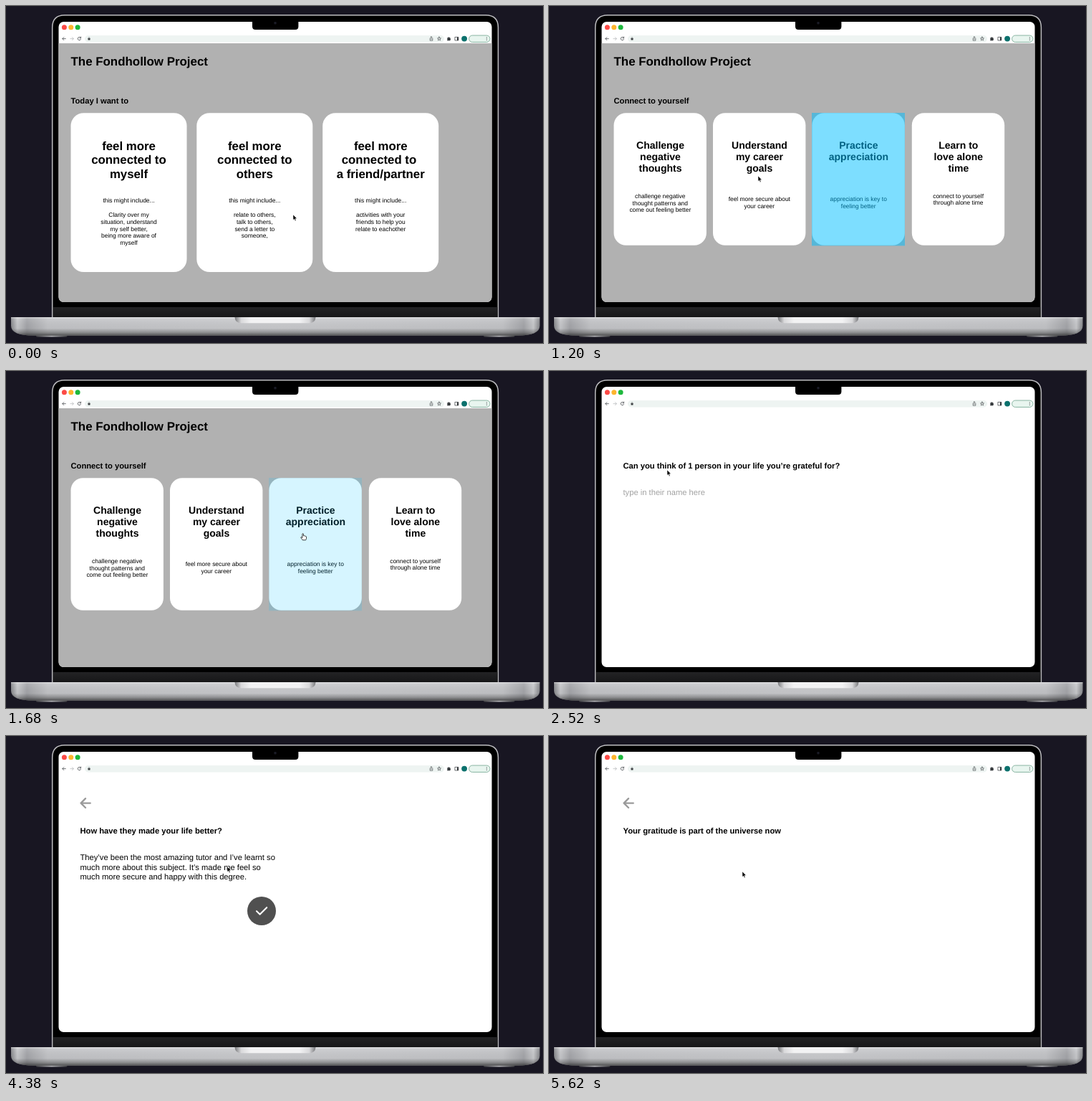
Recreate the animation shown at these times as an HTML page. Size 750 px wide and 470 px high, loop 5.7 s.

```html
<!DOCTYPE html>
<html lang="en">
<head>
<meta charset="utf-8">
<title>Connection prototype</title>
<style>
html, body { margin: 0; width: 100%; height: 100%; overflow: hidden; background: #181622; }
svg { display: block; width: 750px; height: 470px; }
text { font-family: "Liberation Sans", Arial, sans-serif; text-rendering: geometricPrecision; white-space: pre; }
.b { font-weight: bold; }
.m { text-anchor: middle; }
.line { fill: none; stroke-linecap: round; stroke-linejoin: round; }
</style>
</head>
<body>
<svg viewBox="0 0 750 470">
  <defs>
    <linearGradient id="metal">
      <stop offset="0" stop-color="#85868a"/><stop offset=".012" stop-color="#c9cacd"/>
      <stop offset=".03" stop-color="#a5a6aa"/><stop offset=".07" stop-color="#c4c5c8"/>
      <stop offset=".5" stop-color="#cacbce"/><stop offset=".93" stop-color="#c4c5c8"/>
      <stop offset=".97" stop-color="#a5a6aa"/><stop offset=".988" stop-color="#c9cacd"/>
      <stop offset="1" stop-color="#85868a"/>
    </linearGradient>
    <linearGradient id="shade" x2="0" y2="1">
      <stop offset="0" stop-color="#fff" stop-opacity=".45"/><stop offset=".1" stop-color="#fff" stop-opacity=".08"/>
      <stop offset=".6" stop-color="#000" stop-opacity=".04"/><stop offset=".82" stop-color="#000" stop-opacity=".28"/>
      <stop offset="1" stop-color="#000" stop-opacity=".6"/>
    </linearGradient>
    <linearGradient id="lip">
      <stop offset="0" stop-color="#77787b"/><stop offset=".08" stop-color="#d9d9db"/>
      <stop offset=".2" stop-color="#f2f2f3"/><stop offset=".8" stop-color="#f2f2f3"/>
      <stop offset=".92" stop-color="#d9d9db"/><stop offset="1" stop-color="#77787b"/>
    </linearGradient>
    <linearGradient id="hinge" x2="0" y2="1">
      <stop offset="0" stop-color="#232325"/><stop offset="1" stop-color="#161617"/>
    </linearGradient>
    <linearGradient id="foot">
      <stop offset="0" stop-color="#3c3c40"/><stop offset=".5" stop-color="#b4b4b8"/><stop offset="1" stop-color="#3c3c40"/>
    </linearGradient>
    <clipPath id="glass"><rect x="73.5" y="22" width="605" height="391" rx="7"/></clipPath>
  </defs>

  <rect width="750" height="470" fill="#181622"/>
  <path d="M64.7 436V30Q64.7 12.7 82 12.7H670Q687.4 12.7 687.4 30V436Z" fill="#000" stroke="#bcbcbf" stroke-width="1.5"/>
  <rect x="66" y="420" width="620.5" height="15" fill="url(#hinge)"/>

  <g clip-path="url(#glass)">
    <rect x="73" y="22" width="606" height="392" fill="#fff"/>
    <g id="pages"></g>
    <g id="chrome">
      <circle cx="81.4" cy="29.8" r="3.5" fill="#fc4b47"/>
      <circle cx="90.8" cy="29.8" r="3.5" fill="#fdb52e"/>
      <circle cx="100.1" cy="29.8" r="3.5" fill="#1db83c"/>
      <rect x="110" y="41" width="502" height="9.4" rx="4.7" fill="#eef4f2"/>
      <g class="line" stroke="#4b4f52" stroke-width=".8">
        <path d="M83.3 45.6H79M80.8 43.6L78.8 45.6L80.8 47.6"/>
        <path d="M89.9 45.6H94.2M92.4 43.6L94.4 45.6L92.4 47.6" stroke="#b9bcbe"/>
        <path d="M104.2 44.2A2.2 2.2 0 1 0 104.5 46.3M104.6 43V44.8H102.8"/>
        <path d="M592.2 45V48.2H595.8V45M594 46.6V42.8M592.9 43.8L594 42.7L595.1 43.8" stroke-width=".7"/>
        <path d="M605 43L605.7 44.8L607.5 44.9L606.1 46.1L606.6 47.9L605 46.9L603.4 47.9L603.9 46.1L602.5 44.9L604.3 44.8Z" stroke-width=".7"/>
        <rect x="627.3" y="43.4" width="4.4" height="4.6"/>
        <path d="M115.1 45.5V44.6A.9 .9 0 0 1 116.9 44.6V45.5" stroke-width=".6"/>
      </g>
      <rect x="114.5" y="45" width="3" height="2.6" rx=".4" fill="#3c4043"/>
      <path d="M616.2 44.2H617.6A.9 .9 0 0 1 619.4 44.2H620.5V45.4A.9 .9 0 0 1 620.5 47.1V48.2H616.2V46.8A.8 .8 0 0 0 616.2 45.4Z" fill="#35393c"/>
      <rect x="630" y="43.4" width="2" height="4.6" fill="#35393c"/>
      <circle cx="640.1" cy="45.6" r="3.9" fill="#0c716d"/>
      <rect x="646.6" y="41" width="29.4" height="9.4" rx="4.7" fill="#e8f5ef" stroke="#6da38c" stroke-width=".8"/>
      <g fill="#4b4f52"><circle cx="671.3" cy="43.9" r=".55"/><circle cx="671.3" cy="45.7" r=".55"/><circle cx="671.3" cy="47.5" r=".55"/></g>
    </g>
  </g>

  <path d="M344 20H408.4V28.5Q408.4 33 404 33H348.4Q344 33 344 28.5Z" fill="#000"/>
  <circle cx="376" cy="23.7" r="2" fill="#14151c"/><circle cx="376" cy="23.7" r=".8" fill="#25283a"/>

  <rect x="42" y="458" width="43.5" height="3.6" rx="1.6" fill="url(#foot)"/>
  <rect x="667" y="458" width="43.5" height="3.6" rx="1.6" fill="url(#foot)"/>
  <g id="base">
    <path d="M7 434H745.5V446Q745.5 459.5 714 459.8H39Q7 459.5 7 446Z" fill="url(#metal)"/>
    <path d="M7 434H745.5V446Q745.5 459.5 714 459.8H39Q7 459.5 7 446Z" fill="url(#shade)"/>
    <path d="M319.5 434H432.5Q432 442.3 423 442.3H329Q320 442.3 319.5 434Z" fill="url(#lip)"/>
  </g>

  <path id="arrow" d="M0 0V7.5L1.7 6L2.9 8.7L4.1 8.2L3 5.5L5.3 5.4Z" fill="#000" stroke="#fff" stroke-width=".5"/>
  <path id="hand" d="M-.7 .6Q0 -.5 .8 .6V3.2Q1.7 2.6 2.2 3.5Q3.1 3 3.6 3.9Q4.8 3.6 4.9 4.8V6.6Q4.8 8 4 9.2H-.4Q-1.2 7.6 -2.8 5.9Q-3 4.8 -1.8 5L-.7 6Z"
    fill="#fff" stroke="#000" stroke-width=".75" stroke-linejoin="round"/>
</svg>

<script>
const LOOP = 5700, STEP = 20;
const $ = id => document.getElementById(id);

const text = (x, y, size, str, cls = "", fill = "#000") =>
  `<text x="${x}" y="${y}" font-size="${size}" class="${cls}" fill="${fill}">${str}</text>`;
const lines = (x, y, gap, size, rows, cls) =>
  rows.split("|").map((row, i) => text(x, y + i * gap, size, row, cls)).join("");
const card = (x, w, h, r) => `<rect x="${x}" y="149.2" width="${w}" height="${h}" rx="${r}" fill="#fff"/>`;
const grey = heading =>
  `<rect x="73" y="52" width="606" height="362" fill="#b1b1b1"/>` +
  text(90.5, 82.6, 16.9, "The Fondhollow Project", "b") + text(90.5, 136.3, 11.2, heading, "b");
const ask = str => text(103.5, 136.3, 11.2, str, "b");
const hint = str => text(103.5, 173.4, 11.2, str, "", "#a2a2a2");
const check = (x, y) => `<g transform="translate(${x} ${y})"><circle r="20" fill="#505050"/>
  <path class="line" d="M-7 .3L-2.4 4.8L7.2 -4.8" stroke="#fff" stroke-width="2.1"/></g>`;
const back = `<path class="line" d="M117.7 93.6H105M111 87.2L104.6 93.6L111 100" stroke="#9b9b9b" stroke-width="2.4"/>`;

function wideCard(x, title, body) {
  const c = x + 81;
  const rows = title.split("|");
  return card(x, 162, 221.8, 18) +
    rows.map((r, i) => text(c - (x > 400 && i === 1 ? 2.2 : 0), 201 + i * 19.4, 16.8, r, "b m")).join("") +
    text(c, 274.2, 8.45, "this might include...", "m") + lines(c, 294, 9.75, 8.45, body, "m");
}
function slimCard(x, title, y, body) {
  return card(x, 129.4, 184.6, 17) + lines(x + 65, 199, 16.1, 14, title, "b m") +
    lines(x + 64.8, y, 9.75, 8.45, body, "m");
}

const better = "How have they made your life better?";
const person = "Can you think of 1 person in your life you’re grateful for?";

// [start time, content]
const pages = [
  [0, grey("Today I want to") +
    wideCard(90.5, "feel more|connected to|myself", "Clarity over my|situation, understand|my self better,|being more aware of|myself") +
    wideCard(266.3, "feel more|connected to|others", "relate to others,|talk to others,|send a letter to|someone,") +
    wideCard(442.2, "feel more|connected to|a friend/partner", "activities with your|friends to help you|relate to eachother")],
  [260, grey("Connect to yourself") +
    slimCard(90.5, "Challenge|negative|thoughts", 267.8, "challenge negative|thought patterns and|come out feeling better") +
    slimCard(229, "Understand|my career|goals", 272.2, "feel more secure about|your career") +
    slimCard(367.4, "Practice|appreciation", 272.2, "appreciation is key to|feeling better") +
    slimCard(506.8, "Learn to|love alone|time", 267.6, "connect to yourself|through alone time") +
    `<rect id="flash" x="367" y="149" width="130" height="185.4" fill="#00beff"/>`],
  [1740, ask(person) + hint("type in their name here")],
  [2880, ask(person) + text(103.5, 173.4, 11.2, "My tutor") + check(388, 183)],
  [3640, ask(better) + hint("Type in your answer here")],
  [4240, back + ask(better) + check(357, 244) +
    lines(103.5, 173.4, 13.1, 11.2, "They’ve been the most amazing tutor and I’ve learnt so|much more about this subject. It’s made me feel so|much more secure and happy with this degree.")],
  [5200, back + ask("Your gratitude is part of the universe now")]
];
$("pages").innerHTML = pages.map(p => `<g>${p[1]}</g>`).join("");
const groups = [...$("pages").children];

// pointer keys: time, x, y
const path = [
  [0, 401, 291], [240, 172, 240], [440, 172, 240], [520, 440, 60], [580, 634, 52],
  [900, 420, 190], [1060, 222, 250], [1180, 292, 237], [1240, 292, 237],
  [1600, 414, 226], [1740, 415, 227], [1960, 437, 397], [2180, 162, 165], [2300, 264, 128],
  [2340, 264, 128], [2440, 119, 119], [2520, 165, 138], [2660, 178, 164],
  [3020, 178, 164], [3400, 391, 198], [3560, 397, 187], [3640, 397, 187],
  [3900, 260, 211], [4140, 205, 172], [4240, 205, 172], [4380, 309, 182],
  [4540, 408, 205], [4800, 368, 257], [5000, 357, 246], [5380, 363, 233], [5620, 270, 189], [LOOP, 270, 189]
];
// spans in which the pointer rests on something clickable
const hot = [[120, 260], [1420, 1740], [3320, 3640], [4680, 5200]];

function pointer(t) {
  let i = 0;
  while (i < path.length - 2 && path[i + 1][0] <= t) i++;
  const [a, x, y] = path[i], [b, u, v] = path[i + 1];
  const k = (t - a) / (b - a), e = k * k * (3 - 2 * k);
  return [x + (u - x) * e, y + (v - y) * e];
}

function draw(t) {
  const now = pages.filter(p => p[0] <= t).length - 1;
  groups.forEach((g, i) => { g.style.display = i === now ? "" : "none"; });
  $("flash").style.opacity = t < 1180 ? 0 : Math.max(0, .51 - .35 * Math.max(0, t - 1200) / 480);
  const [x, y] = pointer(t);
  const isHot = hot.some(([a, b]) => t >= a && t < b);
  $("arrow").style.display = isHot ? "none" : "";
  $("hand").style.display = isHot ? "" : "none";
  $(isHot ? "hand" : "arrow").setAttribute("transform", `translate(${x.toFixed(2)} ${y.toFixed(2)})`);
}

const start = performance.now();
function tick() {
  const t = Math.max(0, performance.now() - start) % LOOP;
  draw(Math.floor(t / STEP) * STEP);
  requestAnimationFrame(tick);
}
draw(0);
requestAnimationFrame(tick);
</script>
</body>
</html>
```
